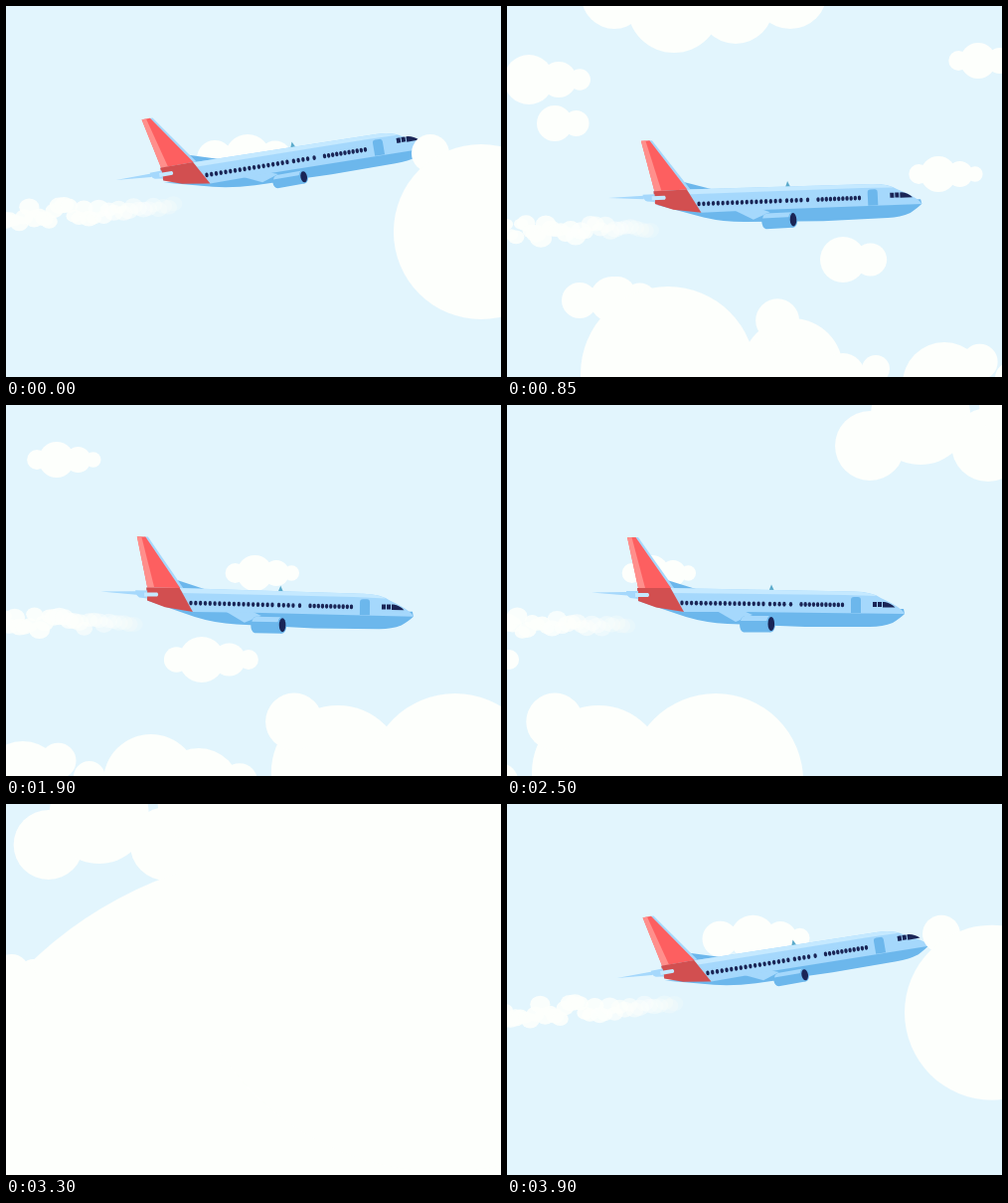
An HTML page with a canvas for the animation above (3.95 s loop, 498 by 373 pixels).

```html
<!DOCTYPE html>
<html lang="en">
<head>
<meta charset="utf-8">
<title>Airplane in the clouds</title>
<style>
  html, body { margin: 0; width: 100%; height: 100%; overflow: hidden; background: #e2f5fd; }
  canvas { display: block; }
</style>
</head>
<body>
<canvas id="stage" width="498" height="373"></canvas>
<script>
const ctx = document.getElementById('stage').getContext('2d');
const LOOP = 3950, STEP = 50, RESET = 3450, LEVEL = 850;
const SKY = '#e2f5fd', CLOUD = '#fdfffc', BODY = '#a5d8fc', SHINE = '#c5e9ff',
      SHADE = '#6cb7ec', RED = '#fd5f60', PINK = '#ff8f8c', DARK_RED = '#d24f50', NAVY = '#1a2556';

// Key poses of the plane: it levels out of a climb, then drifts back
const flight = [
  { t: 0, x: 320.5, y: 151, angle: -9.1 },
  { t: 850, x: 313, y: 194.6, angle: -2.1 },
  { t: 1450, x: 311, y: 202.8, angle: 1.8 },
  { t: 1900, x: 306, y: 202, angle: 1.4 },
  { t: 2500, x: 296, y: 200.5, angle: 0.7 },
  { t: 3450, x: 280, y: 198.5, angle: 0.2 }
];

// Monotone cubic interpolation of one property, at rest at time 0
function track(key, time) {
  const t = Math.max(0, time), last = flight.length - 1;
  const slope = i => (flight[i + 1][key] - flight[i][key]) / (flight[i + 1].t - flight[i].t);
  const tangent = i => {
    if (i === 0) return 0;
    if (i === last) return slope(last - 1);
    const a = slope(i - 1), b = slope(i);
    return a * b > 0 ? 2 * a * b / (a + b) : 0;
  };
  let i = 0;
  while (i < last - 1 && t > flight[i + 1].t) i++;
  const from = flight[i], to = flight[i + 1], span = to.t - from.t;
  const u = (t - from.t) / span, v = 1 - u;
  return from[key] * (1 + 2 * u) * v * v + to[key] * (3 - 2 * u) * u * u
    + span * u * v * (tangent(i) * v - tangent(i + 1) * u);
}

const poseAt = t => ({ x: track('x', t), y: track('y', t), angle: track('angle', t) });

// Camera: speeds up to a steady scroll while its downward pan eases out
function scrollX(t) {
  if (t < 0) return 316 - 0.2 * t;
  const left = LEVEL - t;
  return 0.403 * left - 26.6 * Math.max(0, left / LEVEL) ** 5;
}
const scrollY = t => -143 * Math.max(0, (LEVEL - t) / LEVEL) ** 2;

function random(seed) {
  const s = Math.sin(seed * 127.1 + 3.7) * 43758.5453;
  return s - Math.floor(s);
}

function ellipse(color, x, y, rx, ry) {
  ctx.fillStyle = color;
  ctx.beginPath();
  ctx.ellipse(x, y, rx, ry, 0, 0, 7);
  ctx.fill();
}

const disc = (x, y, r) => ellipse(CLOUD, x, y, r, r);

function shape(color, path) {
  ctx.fillStyle = color;
  ctx.fill(new Path2D(path));
}

function shifted(dx, dy, draw) {
  ctx.save();
  ctx.translate(dx, dy);
  draw();
  ctx.restore();
}

// A row of lobes around a main one: `before` on the left, `after` on the right
function cumulus(x, y, r, before = 1, after = 2) {
  disc(x, y, r);
  if (before) disc(x - 1.1 * r, y, 0.55 * r);
  if (after > 0) disc(x + 1.2 * r, y, 0.72 * r);
  if (after > 1) disc(x + 2.05 * r, y, 0.43 * r);
}

// A round hilltop, with an optional bump on its rim at the given angle
function hill(x, top, r, bump) {
  disc(x, top + r, r);
  if (bump === undefined) return;
  const a = bump * Math.PI / 180;
  disc(x + r * Math.cos(a), top + r + r * Math.sin(a), 0.43 * r);
}

function farClouds() {
  disc(73, 296, 18);
  cumulus(106, 295, 23);
  cumulus(434, 169, 18);
}

function nearClouds() {
  cumulus(22, 74, 25, 0, 2);
  cumulus(48, 118, 18, 0, 1);
  cumulus(338, 255, 23, 0, 1);
  cumulus(474, 55, 18);
  cumulus(620, 256, 23);

  disc(111, 291, 19);
  hill(162, 282, 88);
  hill(287, 314, 51, -107);
  hill(338, 349, 22);
  hill(371, 351, 14);
  hill(440, 338, 42, -32);
  hill(507, 358, 16);
  hill(569, 331, 48);
  hill(617, 345, 42, -12);
  hill(757, 302, 67, -131);
  hill(875, 290, 88);

  disc(108, -10, 33);
  disc(168, 0, 47);
  disc(230, 0, 38);
  disc(285, -14, 37);

  disc(1030, 41, 35);
  disc(1081, 10, 50);
  disc(1149, 40, 37);
  disc(1178, 0, 38);
}

// Wipes across the whole stage
function frontBank() {
  disc(301, 446, 398);
  disc(440, 100, 270);
  disc(2, 185, 32);
  disc(660, 130, 80);
}

function drawTrail(plane, clock) {
  const x0 = plane.x - 174 - 2.4 * plane.angle;
  const y0 = plane.y + 23 - 2.9 * plane.angle;
  const life = 1100, gap = STEP / 2, speed = 0.2;
  for (let i = 0; i < LOOP / gap; i++) {
    const age = (clock - i * gap + LOOP) % LOOP;
    if (age > life) continue;
    const d = age * speed, grow = Math.min(1, d / 100);
    const r = 7.5 + 4 * (random(i) - 0.5) * grow;
    const y = y0 - d * 0.008 * plane.angle + (random(i + 200) - 0.5) * (4 + 15 * grow);
    ctx.globalAlpha = Math.min(0.9, 0.2 + d / 120);
    ellipse(CLOUD, x0 - d, y, r + 1.5, r);
  }
  ctx.globalAlpha = 1;
}

function windowRow(x, gap, count) {
  for (let i = 0; i < count; i++) {
    const wx = x + i * gap;
    ellipse(NAVY, wx, 199 + (wx - 176) * 0.012, 1.7, 2.4);
  }
}

function drawEngine() {
  shape(SHADE, 'M239 212H265V228.5H238Q234 227 234 220Q235 213 239 212Z');
  shape(BODY, 'M239 212H265V217H235Q236 213 239 212Z');
  ellipse(SHADE, 265.5, 220, 4.5, 8.5);
  ellipse(NAVY, 265.8, 220, 3.3, 7);
}

function drawPlane(plane) {
  // The climb turns the underside away and the cockpit up
  const climb = Math.max(0, -plane.angle / 9);
  const flatten = 1 - 0.2 * climb;
  ctx.save();
  ctx.translate(plane.x, plane.y);
  ctx.rotate((plane.angle - 0.7) * Math.PI / 180);
  ctx.translate(-296, -200.5);

  // Far wing and antenna
  shape(SHADE, 'M161 176L190 185H163Z');
  shape('#5aaacb', 'M263.5 187L266 180.5L269 187Z');

  // Underside, near wing and engine
  ctx.save();
  ctx.translate(0, 207 * (1 - flatten));
  ctx.scale(1, flatten);
  shape(SHADE, 'M132 197L177 205H399L400 210Q396 214 388 219Q378 223 365 223H300L222 220Q200 219 180 213Z');
  shape(BODY, 'M211 207L230 218L247 211L238 207Z');
  shifted((plane.x - 296) / 4, 0, drawEngine);
  ctx.restore();

  // Fuselage
  shape(BODY, 'M131 184H163L350 187.5Q368 188 376 194Q398 204 400 210L238 208H178L132 197Z');
  shape(SHINE, 'M163 184L350 187.5Q365 188 372 192L340 191L168 189Z');

  // Fin and tail
  shape(BODY, 'M128 133H132L168 184H160Z');
  shape(RED, 'M121 133H129.5L165 184H132Z');
  shape(PINK, 'M121 133H125.5L139 184H132Z');
  shape(DARK_RED, 'M131 184H164.5L178 208L150 203.5L132 197Z');
  shape(BODY, 'M85 188.5L121 188V191.5Z');
  shape(BODY, 'M120 187H132V195L124 194Q120 192 120 187Z');
  shape(SHINE, 'M129 189H142Q144 191 142 193H129Z');

  // Door, cabin windows, cockpit
  shape(SHADE, 'M346 209V196Q346 193 349 193H353Q356 193 356 196V209Z');
  windowRow(176, 4.82, 18);
  windowRow(264.5, 4.8, 4);
  windowRow(285.5, 1, 1);
  windowRow(296, 4.15, 11);
  shifted(2 * climb, -3 * climb, () =>
    shape(NAVY, 'M368 198H372V203H368ZM373 198H377V203H373ZM378 198H380Q386 199 390.5 203.5H378Z'));
  ctx.restore();
}

function render(clock) {
  const t = clock >= RESET ? clock - LOOP : clock;
  const dx = scrollX(t), dy = scrollY(t), plane = poseAt(t);
  ctx.fillStyle = SKY;
  ctx.fillRect(0, 0, 498, 373);
  shifted(dx * 0.434, dy, farClouds);
  drawTrail(plane, clock);
  drawPlane(plane);
  shifted(dx, dy, nearClouds);
  if (clock > 2600) shifted((3300 - clock) * 1.3, 0, frontBank);
}

const start = performance.now();
function tick() {
  const clock = (performance.now() - start) % LOOP;
  render(Math.floor(clock / STEP) * STEP);
  requestAnimationFrame(tick);
}
tick();
</script>
</body>
</html>
```
